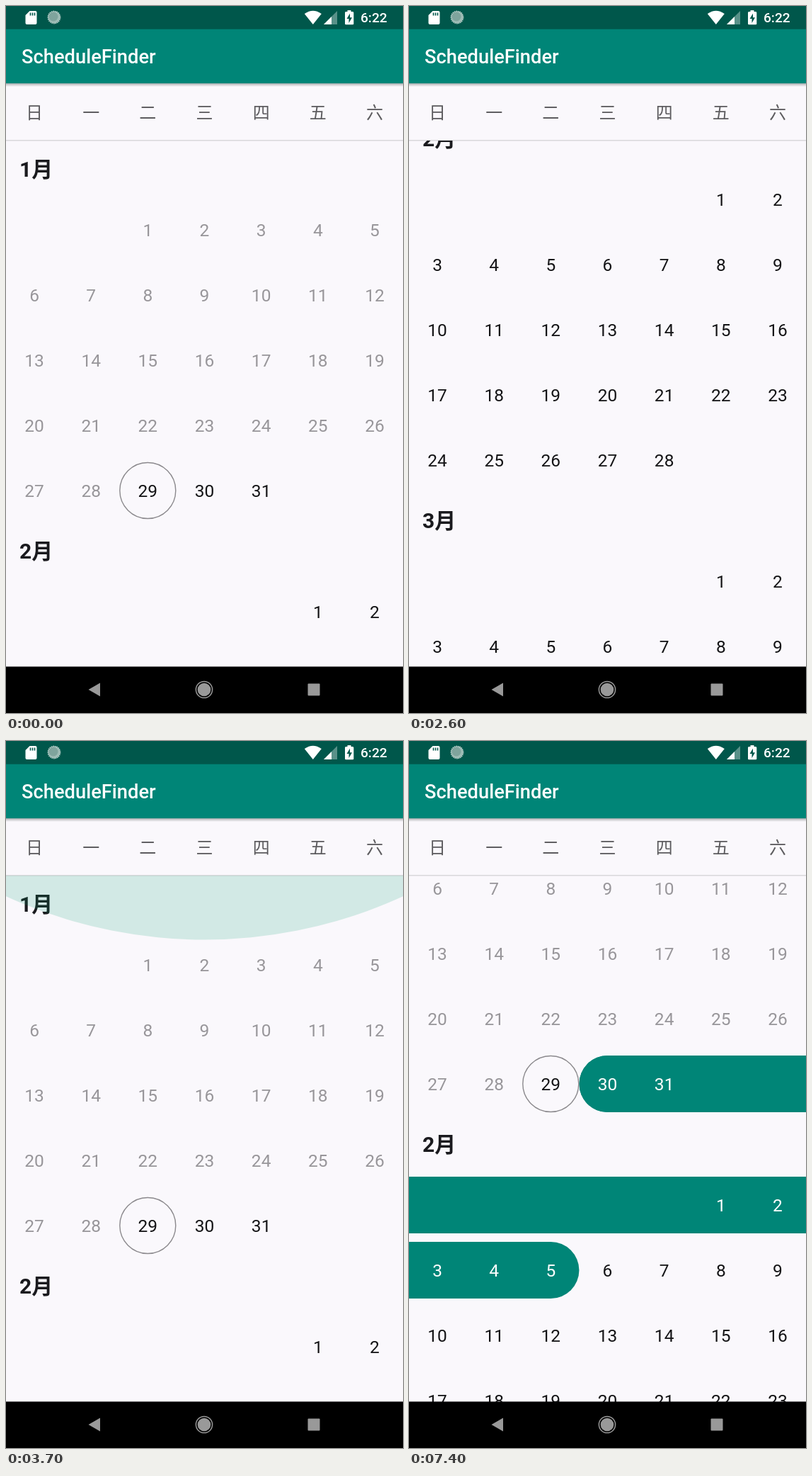
These frames come from a looping animation (561x998 px, 8000 ms). An HTML page:

```html
<!DOCTYPE html>
<html lang="zh">
<head>
<meta charset="utf-8">
<style>
  html, body { margin: 0; width: 100%; height: 100%; overflow: hidden; background: #faf8fc; }
  svg { display: block; width: 561px; height: 998px; font-family: Roboto, "Noto Sans CJK SC", "Noto Sans CJK", sans-serif; }
  .day { font-size: 24.5px; text-anchor: middle; fill: #141416; }
  .day.past { fill: #98969a; }
  .day.picked { fill: #fff; }
  .weekday { font: 24px "Noto Sans CJK SC", "Noto Sans CJK", sans-serif; text-anchor: middle; fill: #5c5b5e; }
  .month { font-size: 30px; font-weight: 700; fill: #1a1a1e; }
  .title { font-size: 27.3px; font-weight: 500; fill: #fff; }
  .clock { font-size: 19.1px; font-weight: 500; fill: #fff; }
</style>
</head>
<body>
<svg viewBox="0 0 561 998">
  <defs>
    <clipPath id="listArea"><rect y="190" width="561" height="743"/></clipPath>
    <linearGradient id="shade" x2="0" y2="1">
      <stop stop-color="#000" stop-opacity=".3"/>
      <stop offset="1" stop-color="#000" stop-opacity="0"/>
    </linearGradient>
  </defs>
  <rect width="561" height="998" fill="#faf8fc"/>

  <g id="weekdays"></g>
  <rect y="189" width="561" height="1.5" fill="#d9d8db"/>
  <g clip-path="url(#listArea)">
    <g id="list">
      <g id="selection" fill="#008577"></g>
      <circle cx="200.3" cy="684" r="39.5" fill="none" stroke="#8b898d" stroke-width="1.4"/>
      <g id="days"></g>
    </g>
    <ellipse id="glow" cx="280.5" rx="673" fill="#009a68"/>
  </g>

  <rect y="109" width="561" height="5" fill="url(#shade)"/>
  <rect y="32" width="561" height="77.2" fill="#008577"/>
  <rect width="561" height="32.7" fill="#00574b"/>
  <text class="title" x="22" y="81">ScheduleFinder</text>

  <g fill="#fff">
    <path d="M33.5 7H41.5Q43.5 7 43.5 9V24Q43.5 26 41.5 26H29.5Q27.5 26 27.5 24V13Z"/>
    <path d="M34.5 9.5V13.5M37.5 9.5V13.5M40.5 9.5V13.5" stroke="#00574b" stroke-width="1.6"/>
    <circle cx="68" cy="16" r="8.5" fill="#9fbcb6"/>
    <circle cx="67" cy="15" r="6.5" fill="#7fa49d"/>
    <circle cx="68" cy="16" r="8.7" fill="none" stroke="#b9cfca" stroke-width="1.4" stroke-dasharray="1.6 1"/>
    <path d="M433.8 26L421.8 11Q433.8 2.5 445.8 11Z"/>
    <path d="M468 7V26H449Z" opacity=".35"/>
    <path d="M460 15V26H449Z"/>
    <path d="M482.5 8V6H487.5V8H490Q491.3 8 491.3 9.5V25Q491.3 26.3 490 26.3H480.3Q479 26.3 479 25V9.5Q479 8 480.3 8Z"/>
    <path d="M486 10.5L481.5 18H484.5V24L489 16.3H486Z" fill="#00574b"/>
  </g>
  <text class="clock" x="501" y="23">6:22</text>

  <rect y="932.5" width="561" height="66"/>
  <g fill="#999">
    <path d="M116.5 965L133 955.5V974.5Z"/>
    <circle cx="280" cy="965" r="9.3"/>
    <circle cx="280" cy="965" r="11.6" fill="none" stroke="#999" stroke-width="1.5"/>
    <rect x="426.5" y="956.5" width="17" height="17" rx="1"/>
  </g>
</svg>
<script>
const LOOP = 8000, STEP = 100;
const COL = 561 / 7, ROW = 92, MONTH_GAP = 171, RADIUS = 40;
const LIST_TOP = 190, GLOW_RADIUS = 673, GLOW_DEPTH = 90.5;
const TODAY = 29, PICK_FROM = 30, PICK_TO = 36; // days of the year
const PICK_FIRST_AT = 5900, PICK_LAST_AT = 7400;

const $ = id => document.getElementById(id);
const colX = col => COL * (col + 0.5);

function add(parent, tag, attrs, text = '') {
  const node = document.createElementNS('http://www.w3.org/2000/svg', tag);
  for (const key in attrs) node.setAttribute(key, attrs[key]);
  node.textContent = text;
  return parent.appendChild(node);
}

[...'日一二三四五六'].forEach((name, col) =>
  add($('weekdays'), 'text', { class: 'weekday', x: colX(col), y: 158.5 }, name));

const days = []; // index 0 is January 1st
let rowY = 316;
for (let month = 0; month < 3; month++) {
  const first = new Date(2019, month, 1).getDay();
  const count = new Date(2019, month + 1, 0).getDate();
  add($('days'), 'text', { class: 'month', x: 19, y: rowY - 75 }, `${month + 1}月`);
  for (let d = 1; d <= count; d++) {
    const cell = first + d - 1;
    const y = rowY + Math.floor(cell / 7) * ROW;
    const past = days.length + 1 < TODAY;
    days.push(add($('days'), 'text', { class: past ? 'day past' : 'day', x: colX(cell % 7), y: y + 9.2 }, d));
  }
  rowY += (Math.ceil((first + count) / 7) - 1) * ROW + MONTH_GAP;
}

const startDot = add($('selection'), 'circle', { cx: colX(3), cy: 684, r: RADIUS });
const range = add($('selection'), 'g', {});

// The ends lie outside the stage where the range runs on to the next row.
function band(y, left, right) {
  add(range, 'rect', { x: left, y: y - RADIUS, width: right - left, height: 2 * RADIUS, rx: RADIUS });
}
band(684, COL * 3, 610);
band(684 + MONTH_GAP, -50, 610);
band(684 + MONTH_GAP + ROW, -50, COL * 3);

const clamp = x => Math.min(1, Math.max(0, x));
const progress = (time, start, end) => clamp((time - start) / (end - start));

// A swipe builds up speed, then slows to a stop.
const swipe = (time, start, end, distance, power = 1.3) =>
  distance * Math.sin(Math.PI / 2 * progress(time, start, end) ** power);

const scrollAt = time =>
  swipe(time, 1600, 2000, 265) +
  swipe(time, 2300, 2900, 641, 1.6) +
  swipe(time, 3000, 3600, -906) +
  swipe(time, 4000, 4500, 200, 1.6);

const glowAt = time =>
  progress(time, 3500, 3700) * (1 - progress(time, 3700, 4300)) ** 2;

function draw(now) {
  const time = Math.floor(now % LOOP / STEP) * STEP;
  const glow = glowAt(time);
  $('list').setAttribute('transform', `translate(0 ${-Math.round(scrollAt(time))})`);
  $('glow').setAttribute('cy', LIST_TOP + (GLOW_DEPTH - GLOW_RADIUS) * glow);
  $('glow').setAttribute('ry', GLOW_RADIUS * glow);
  $('glow').setAttribute('opacity', 0.16 * glow);

  const started = time >= PICK_FIRST_AT, finished = time >= PICK_LAST_AT;
  const last = finished ? PICK_TO : started ? PICK_FROM : 0;
  days.forEach((day, i) => day.classList.toggle('picked', i + 1 >= PICK_FROM && i + 1 <= last));
  startDot.style.display = started ? '' : 'none';
  range.style.display = finished ? '' : 'none';
}

const start = performance.now();
function tick() {
  draw(performance.now() - start);
  requestAnimationFrame(tick);
}
tick();
</script>
</body>
</html>
```
